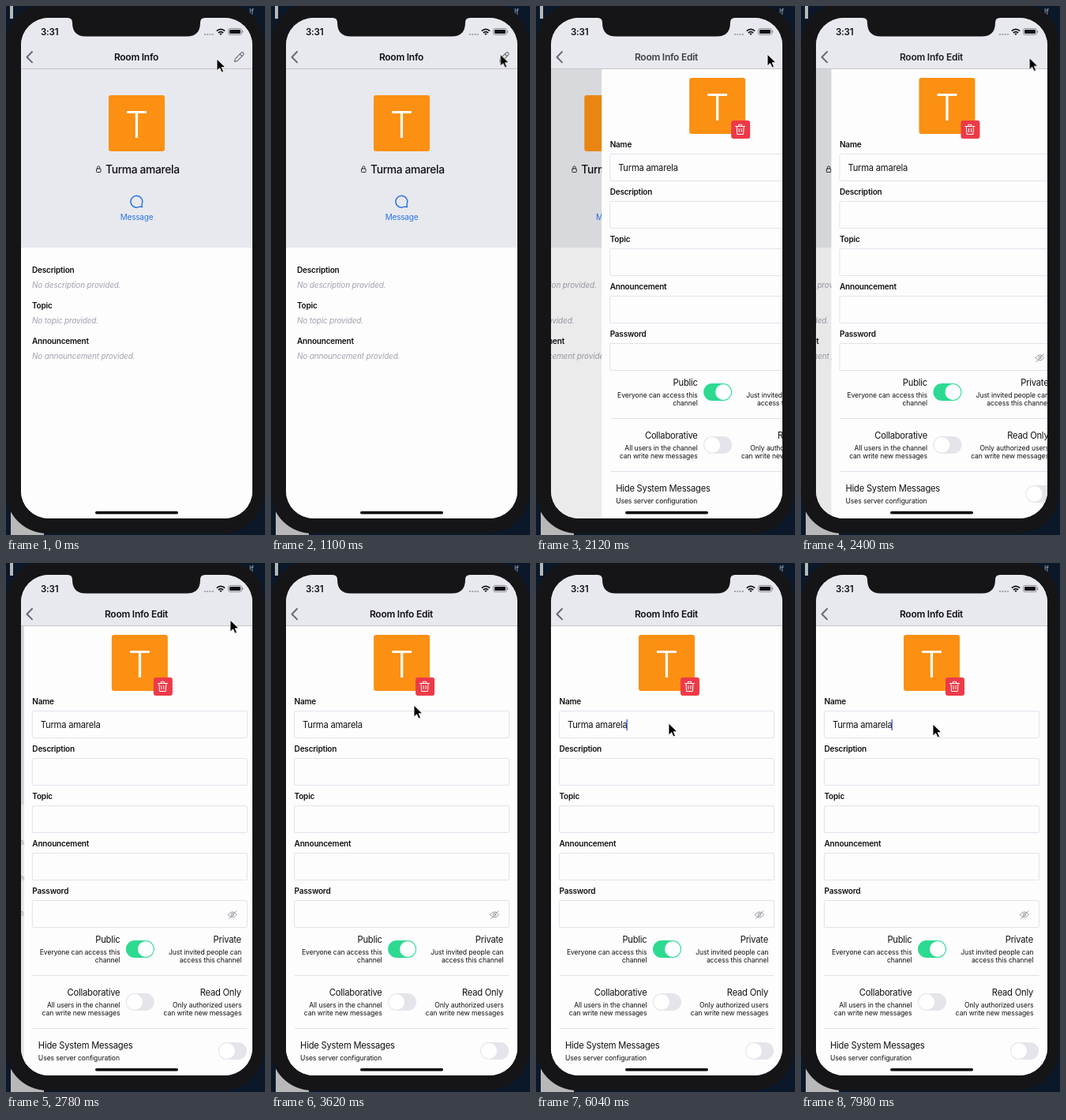
Animation, 328 px wide and 670 px high, one loop 8 s. Source, as an HTML page:

```html
<!DOCTYPE html>
<html lang="en">
<head>
<meta charset="utf-8">
<title>Room Info</title>
<style>
  @property --t { syntax: "<number>"; inherits: true; initial-value: 0; }

  html, body { margin: 0; width: 100%; height: 100%; overflow: hidden; background: #0a182a; }

  svg {
    display: block;
    font: 400 10px Inter, "Open Sans", sans-serif;
    letter-spacing: -.2px;
    fill: #101014;
    animation: clock 8s linear infinite;
    /* overdamped push transition: 0 = info page, 1 = edit page */
    --p: calc(1 - exp(-4.26 * max(0, var(--t) - 1.7645)));
  }
  @keyframes clock { from { --t: 0; } to { --t: 8; } }

  .info { transform: translateX(calc(var(--p) * -88px)); }
  .edit { transform: translateX(calc((1 - var(--p)) * 293px)); }
  .shade { opacity: calc(var(--p) * .09); }
  .title { font-size: 12px; font-weight: 600; letter-spacing: -.25px; text-anchor: middle; }
  .old { opacity: clamp(0, 1 - 1.4 * var(--p), 1); }
  .new { opacity: var(--p); }
  .pencil { opacity: clamp(0, 1 - 3 * var(--p), 1); }

  .label { font-weight: 600; }
  .empty { font-style: italic; letter-spacing: -.17px; fill: #a0a3b0; }
  .name { font-size: 13.8px; font-weight: 500; letter-spacing: -.33px; }
  .option { font-size: 11.2px; letter-spacing: -.22px; }
  .hint { font-size: 8.6px; letter-spacing: -.08px; }
  .end { text-anchor: end; }
  .letter { font-size: 47px; font-weight: 300; fill: #fff; text-anchor: middle; letter-spacing: 0; }
  .line { fill: none; stroke-linecap: round; stroke-linejoin: round; }

  .caret { fill: #3c5cd0; animation: appear 8s step-end infinite, blink 485ms 130ms linear infinite; }
  @keyframes appear { 0% { visibility: hidden; } 56% { visibility: visible; } }
  @keyframes blink { 0%, 55% { opacity: 1; } 70%, 88% { opacity: 0; } 100% { opacity: 1; } }

  .cursor { animation: point 8s linear infinite; }
  @keyframes point {
    0%, 3% { transform: translate(267px, 67px); animation-timing-function: ease-in-out; }
    18%, 23% { transform: translate(295px, 60px); }
    26.5% { transform: translate(293px, 61px); }
    34.75% { transform: translate(284px, 72px); }
    40% { transform: translate(237px, 126px); }
    45.25% { transform: translate(181px, 180px); animation-timing-function: ease-out; }
    51%, 84% { transform: translate(168px, 203px); }
    92%, 100% { transform: translate(167px, 204px); }
  }
</style>
</head>
<body>
<svg width="328" height="670" viewBox="0 0 328 670">
  <defs>
    <clipPath id="screen"><rect x="19" y="15" width="293" height="634" rx="35"/></clipPath>
    <g id="avatar">
      <rect x="130" y="113" width="71" height="71" rx="3" fill="#fb9012"/>
      <text class="letter" x="165.5" y="166.5">T</text>
    </g>
    <rect id="field" x="29.5" y="187.5" width="272" height="34" rx="1.5" fill="none" stroke="#e2e2ee"/>
    <g id="off">
      <rect width="36" height="22" rx="11" fill="#e4e4ea"/>
      <circle cx="11" cy="11" r="10" fill="#fff"/>
    </g>
  </defs>

  <!-- desktop and phone body -->
  <rect width="328" height="670" fill="#0a182a"/>
  <path d="M5 0h4v16h-4zM6 640h42v30h-42z" fill="#b8b8b8"/>
  <text x="308" y="11" fill="#a4acb4">lf</text>
  <rect y="-4" width="327" height="672" rx="52" fill="#151518"/>

  <g clip-path="url(#screen)">
    <rect x="19" y="15" width="293" height="634" fill="#fdfdfd"/>

    <g class="info">
      <rect x="19" y="80" width="293" height="569" fill="#fdfdfd"/>
      <rect x="19" y="80" width="293" height="226" fill="#e8e9ee"/>
      <use href="#avatar"/>
      <g class="line" stroke="#2c2c30">
        <rect x="114.5" y="206" width="5.5" height="4.5" rx=".8"/>
        <path d="M115.7 206v-1.5a1.6 1.6 0 0 1 3.2 0v1.5"/>
      </g>
      <text class="name" x="126" y="212">Turma amarela</text>
      <path class="line" d="M172.5 254.5L172 251a7.4 7.4 0 1 0-3 3.2z" stroke="#2a74e4" stroke-width="1.5"/>
      <text x="165.5" y="271" text-anchor="middle" fill="#2a74e4">Message</text>
      <text class="label" x="33" y="338">Description</text>
      <text class="empty" x="33" y="356.5">No description provided.</text>
      <text class="label" x="33" y="383">Topic</text>
      <text class="empty" x="33" y="401.5">No topic provided.</text>
      <text class="label" x="33" y="428">Announcement</text>
      <text class="empty" x="33" y="447">No announcement provided.</text>
    </g>
    <rect class="shade" x="19" y="80" width="293" height="569" fill="#000"/>

    <g class="edit">
      <rect x="19" y="80" width="293" height="569" fill="#fdfdfd"/>
      <use href="#avatar" y="-22"/>
      <rect x="183" y="145" width="24" height="23" rx="3" fill="#ee3a48"/>
      <path class="line" d="M188.5 152.5h12M192.5 152.3v-2h4v2M190 152.5l.6 10h7.8l.6-10M193 155.500v4M196 155.500v4" stroke="#fff"/>

      <text class="label" x="29.5" y="178.5">Name</text>
      <text class="label" x="29.5" y="238.5">Description</text>
      <text class="label" x="29.5" y="298.5">Topic</text>
      <text class="label" x="29.5" y="358.5">Announcement</text>
      <text class="label" x="29.5" y="418.5">Password</text>
      <use href="#field"/>
      <use href="#field" y="60"/>
      <use href="#field" y="120"/>
      <use href="#field" y="180"/>
      <use href="#field" y="240"/>
      <text class="option" x="40" y="208.5">Turma amarela</text>
      <rect class="caret" x="114.5" y="198" width="1.3" height="14"/>
      <g class="line" stroke="#9a9ca4">
        <path d="M277.5 445.5q5.5-7.5 11 0q-5.5 7-11 0z"/>
        <circle cx="283" cy="445.3" r="1.7"/>
        <path d="M278.5 450.5l9.5-10"/>
      </g>

      <g class="option end">
        <text x="140.5" y="480.5">Public</text>
        <text x="294" y="480.5">Private</text>
        <text x="140.5" y="547.5">Collaborative</text>
        <text x="294" y="547.5">Read Only</text>
      </g>
      <g class="hint end">
        <text x="140.5" y="495.5">Everyone can access this</text>
        <text x="140.5" y="506">channel</text>
        <text x="294.5" y="495.5">Just invited people can</text>
        <text x="294.5" y="506">access this channel</text>
        <text x="140.5" y="562.5">All users in the channel</text>
        <text x="140.5" y="573">can write new messages</text>
        <text x="294.5" y="562.5">Only authorized users</text>
        <text x="294.5" y="573">can write new messages</text>
      </g>
      <text class="option" x="37" y="615">Hide System Messages</text>
      <text class="hint" x="37" y="630">Uses server configuration</text>
      <path d="M30 522.5h271.5M30 589.5h271.5" stroke="#e0e0ea"/>
      <rect x="148" y="478" width="36" height="22" rx="11" fill="#2cda90"/>
      <circle cx="173" cy="489" r="10" fill="#fff"/>
      <use href="#off" x="148" y="545"/>
      <use href="#off" x="265" y="607"/>
    </g>

    <!-- header and status bar -->
    <rect x="19" y="15" width="293" height="65" fill="#e8e9ee"/>
    <path d="M19 79.5h293" stroke="#c4c4c8"/>
    <path class="line" d="M33 58l-6.5 6.7l6.5 6.7" stroke="#6a6c72" stroke-width="2"/>
    <text class="title old" x="165" y="69">Room Info</text>
    <text class="title new" x="165" y="69">Room Info Edit</text>
    <path class="line pencil" d="M289.5 70.5l.8-3.6l7.6-7.7q1.2-1.2 2.5 0q1.4 1.3.2 2.7l-7.6 7.7zM296.3 61l2.7 2.7" stroke="#6a6c72" stroke-width="1.1"/>
    <text x="44" y="37" font-size="11.5" font-weight="600">3:31</text>
    <path d="M251 36h12" stroke="#a4a6ac" stroke-width="2" stroke-dasharray="2 1.3"/>
    <path d="M266.8 31.7q5.2-4.6 10.4 0M268.9 34q3.1-2.7 6.2 0" fill="none" stroke="#101014" stroke-width="1.7"/>
    <path d="M270.3 35.1q1.7-1.2 3.4 0l-1.7 1.9z"/>
    <rect x="281.5" y="28.5" width="17" height="8" rx="2.3" fill="none" stroke="#8c8e94"/>
    <rect x="283" y="30" width="14" height="5" rx="1"/>
    <path d="M299.7 31v3" stroke="#8c8e94"/>
    <rect x="113" y="640" width="105" height="3.5" rx="1.75" fill="#040404"/>
  </g>
  <path d="M78 14v1q6 0 6 6q0 17.5 17 17.5h128q17 0 17-17.5q0-6 6-6v-1z" fill="#151518"/>

  <path class="cursor" d="M0 0V15L3.6 11.7L6 17L8.5 15.9L6.2 10.7H11Z" fill="#000" stroke="#fff" stroke-width=".9"/>
</svg>
</body>
</html>
```
